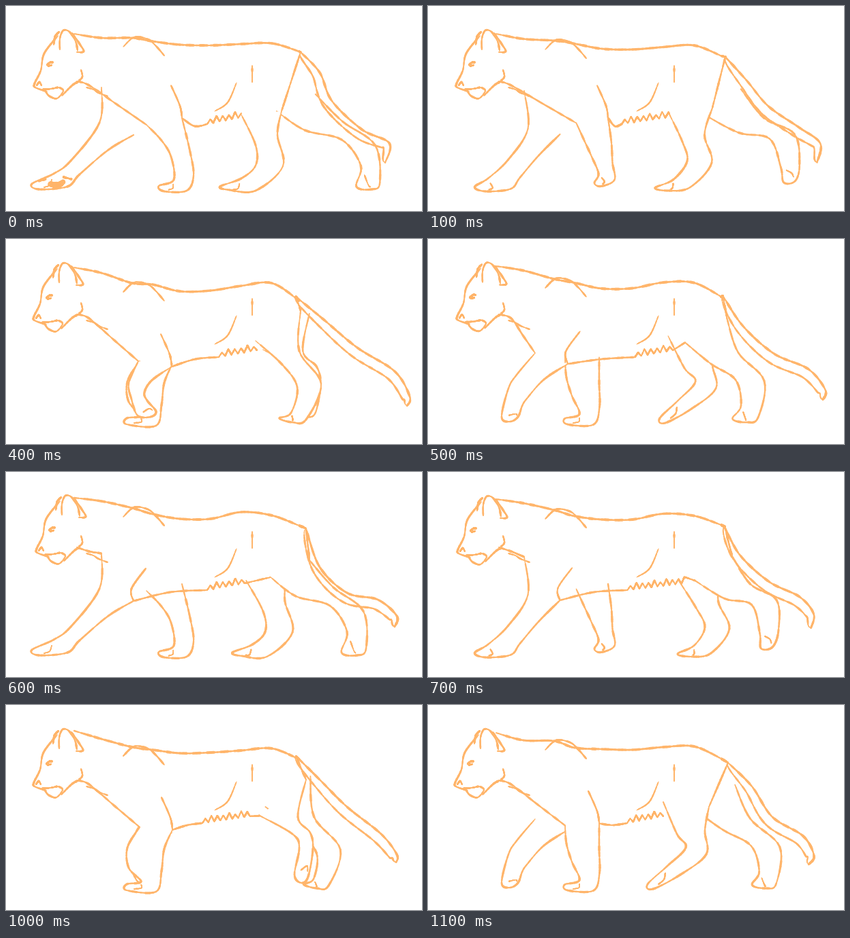
These frames come from a looping animation (610 px wide and 302 px high, 1.2 s). An HTML page with a canvas:

```html
<!DOCTYPE html>
<html lang="en">
<head>
<meta charset="utf-8">
<title>Walking lioness</title>
<style>
html, body { margin: 0; width: 100%; height: 100%; overflow: hidden; background: #fff; }
canvas { display: block; }
</style>
</head>
<body>
<canvas id="stage" width="610" height="302"></canvas>
<script>
const STEP = 100, STEPS = 12, SAMPLES = 72;
const ctx = document.getElementById('stage').getContext('2d');
const points = text => text.split(' ').map(p => p.split(',').map(Number));

// Key poses stand at steps 0, 2, 4, 6, 8, 10 and 11.
// A leg is one outline: front edge, foot, back edge.
const foreleg = [
  '140,120 137,172 95,228 70,247 38,262 48,270 90,266 108,248 150,212 187,190',
  '142,130 156,190 140,225 106,261 99,271 120,276 152,273 162,257 175,228 200,188',
  '196,180 178,210 180,240 198,260 177,264 177,273 220,275 228,245 232,212 244,184',
  '206,175 228,198 242,222 246,256 224,265 232,273 265,272 275,250 270,215 258,165',
  '229,170 231,200 238,222 254,238 264,257 276,258 282,240 266,212 268,188 270,165',
  '194,180 180,212 184,236 193,260 212,262 220,254 207,238 203,226 214,208 243,188',
  '157,168 130,200 118,220 108,262 120,269 132,262 138,246 145,235 170,207 205,184'
].map(points);

const hindleg = [
  '345,160 366,205 366,235 345,254 314,266 328,271 366,272 406,236 398,190 404,155',
  '362,157 380,195 394,222 375,257 352,270 380,273 403,262 426,226 413,190 430,145',
  '366,150 405,185 427,218 418,256 401,264 420,270 440,266 462,213 430,165 432,105',
  '388,155 425,183 475,197 500,235 492,266 515,270 528,260 524,205 480,170 445,130',
  '395,165 445,190 474,194 473,240 485,254 496,245 500,205 498,172 465,160 446,115',
  '372,163 420,190 430,210 423,250 433,262 443,253 450,212 446,188 428,165 440,110',
  '345,143 365,190 378,210 350,238 322,264 330,271 370,250 408,220 406,185 412,150'
].map(points);

// How much further back the far hind leg swings.
const farSway = [18, 48, 36, 22, 45, 12, 18];

const backX = [100, 140, 185, 215, 255, 300, 345, 390, 430];
const backY = [
  [41, 47, 47, 52, 57, 58, 56, 55, 67],
  [41, 50, 55, 59, 69, 70, 65, 61, 80],
  [42, 50, 65, 67, 77, 76, 69, 65, 91],
  [38, 43, 53, 62, 69, 69, 59, 64, 79],
  [42, 49, 59, 68, 71, 71, 64, 65, 77],
  [38, 50, 62, 66, 71, 70, 67, 64, 80],
  [41, 52, 53, 63, 65, 66, 62, 61, 79]
];

const tail = [
  '432,68 460,98 478,140 522,182 562,202 556,231',
  '440,82 475,122 520,155 565,175 588,202 585,230',
  '425,85 465,118 515,160 570,195 592,232 588,246',
  '440,83 460,140 500,178 545,188 573,212 570,228',
  '430,78 455,105 500,145 545,180 558,206 553,232',
  '425,75 460,110 500,150 550,190 573,220 572,232',
  '440,85 475,120 505,165 550,193 566,222 558,235'
].map(points);

const ears = '79,64 79,48 84,36 93,38 102,52 105,66/97,40 108,56 114,67 104,68/70,57 72,45 78,38';
const face = '76,44 56,70 51,95 42,114 43,120 60,126/45,117 49,112 52,117/54,123 66,122 76,120/58,126 64,133 75,136 84,125 78,120/82,132 97,117 105,112/60,87 65,83 69,83/62,88 67,87';
const head = (ears + '/' + face).split('/').map(points);
const headShift = [[0, 0], [0, 0], [-1, 0], [3, -1], [1, 1], [-1, 0], [-2, 0]];
const furSpan = [[295, 345], [273, 360], [312, 368], [295, 350], [290, 402], [288, 358], [292, 345]];

const mid = (a, b) => Array.isArray(a) ? a.map((v, i) => mid(v, b[i])) : (a + b) / 2;

function keyed(keys, step) {
  step %= STEPS;
  if (step === STEPS - 1) return keys[6];
  const i = step >> 1;
  return step % 2 ? mid(keys[i], keys[i + 1]) : keys[i];
}

// Catmull-Rom curve through the points, sampled evenly along the index.
function curve(pts) {
  const last = pts.length - 1;
  const at = i => pts[Math.max(0, Math.min(last, i))];
  return Array.from({ length: SAMPLES + 1 }, (_, n) => {
    const u = n / SAMPLES * last, i = Math.min(Math.floor(u), last - 1), t = u - i;
    return [0, 1].map(k => {
      const a = at(i - 1)[k], b = at(i)[k], c = at(i + 1)[k], d = at(i + 2)[k];
      return b + t / 2 * (c - a + t * (2 * a - 5 * b + 4 * c - d + t * (3 * (b - c) + d - a)));
    });
  });
}

// Pressure varies along each line, as with a sketching brush.
function brush(pts, width = 2.8, line = curve(pts)) {
  for (let i = 0; i < SAMPLES; i++) {
    const [x, y] = line[i];
    const taper = Math.min(1, 0.6 + Math.min(i, SAMPLES - i) / 12);
    ctx.lineWidth = width * taper * (1 + 0.2 * Math.sin(x * 0.31 + y * 0.23) + 0.12 * Math.sin(x * 0.9 - y * 0.7));
    ctx.beginPath();
    ctx.moveTo(x, y);
    ctx.lineTo(...line[i + 1]);
    ctx.stroke();
  }
}

function drawLeg(pts, near) {
  if (near) {
    ctx.beginPath();
    for (const p of curve(pts)) ctx.lineTo(...p);
    ctx.fill();
  }
  brush(pts);
  const toe = mid(pts[4], pts[6]);
  brush([mid(toe, pts[3]), toe, mid(toe, pts[5])], 1.8);
}

function drawTail(pts) {
  const upper = curve(pts);
  const lower = upper.map(([x, y], i) => {
    const [x1, y1] = upper[Math.max(0, i - 3)], [x2, y2] = upper[Math.min(SAMPLES, i + 3)];
    const gap = 15 * Math.sqrt(Math.max(0, Math.sin(Math.PI * i / SAMPLES))) / Math.hypot(x2 - x1, y2 - y1);
    return [x - (y2 - y1) * gap, y + (x2 - x1) * gap];
  });
  brush(pts, 3.1);
  brush(pts, 2.6, lower);
}

function drawFur([left, right], rear) {
  const count = Math.round((right - left) / 4.5);
  const tuft = Array.from({ length: count + 1 }, (_, i) => {
    const base = 174 - 10 * i / count;
    return [left + (right - left) * i / count, base - (i % 2 ? 8 + 2 * Math.sin(i * 5) : 0)];
  });
  for (let i = 0; i < count; i++) brush([tuft[i], tuft[i + 1]], 2);
  if (rear[0] > right) brush([tuft[count], rear], 2.2);
  return tuft[0];
}

function drawTorso(step, fore, hind) {
  const ys = keyed(backY, step), back = backX.map((x, i) => [x, ys[i]]);
  const tailLine = keyed(tail, step);
  brush(back, 3.2);
  brush([back.at(-1), tailLine[0]], 3);
  drawTail(tailLine);

  const hump = ys[2];
  brush([[172, hump + 13], [188, hump - 1], [208, hump + 2], [220, hump + 12], [232, hump + 26]], 2.4);

  const neck = [122, 117], [x, y] = fore.at(-1);
  brush([[104, 111], neck, mid(neck, fore[0]), fore[0]], 2.6);
  brush([[118, 120], [128, 123], [136, 128], [149, 133]], 1.9);
  brush([[110, 94], [112, 104], [107, 110]], 2);
  brush([[x + (x < 215 ? 18 : -16), y - 48], [x - 3, y - 18], [x, y]], 2.4);

  const furStart = drawFur(keyed(furSpan, step), hind[0]);
  brush([[x, y], mid([x, 180], furStart), furStart], 2.6);
  brush([tailLine[0], mid(tailLine[0], hind.at(-1)), hind.at(-1)], 2.5);
  brush([[306, 155], [325, 142], [338, 113]], 1.8);
  brush([[361, 88], [361, 112]], 2);
}

function draw(step) {
  ctx.fillStyle = '#fff';
  ctx.fillRect(0, 0, 610, 302);
  ctx.strokeStyle = '#ffb56b';
  ctx.lineCap = 'round';

  const half = STEPS / 2;
  const fore = keyed(foreleg, step + half), hind = keyed(hindleg, step);
  const sway = keyed(farSway, step + half);
  const farHind = keyed(hindleg, step + half)
    .map(([x, y], i, all) => [x + sway * (0.4 + 0.6 * Math.sin(Math.PI * i / (all.length - 1))), y]);

  drawLeg(keyed(foreleg, step));
  drawLeg(farHind);
  drawLeg(fore, true);
  drawLeg(hind, true);
  drawTorso(step, fore, hind);

  // The raised sole shows its pads.
  if (step === 0) {
    brush([[64, 262], [76, 264], [84, 259]], 8);
    brush([[48, 258], [58, 255]], 3);
    brush([[84, 252], [96, 255]], 3);
  }

  const [dx, dy] = keyed(headShift, step);
  ctx.save();
  ctx.translate(dx, dy);
  for (const line of head) brush(line, 2.5);
  ctx.restore();
}

let shown = -1;
function tick(now) {
  const step = Math.floor(now / STEP) % STEPS;
  if (step !== shown) draw(shown = step);
  requestAnimationFrame(tick);
}
tick(0);
</script>
</body>
</html>
```
